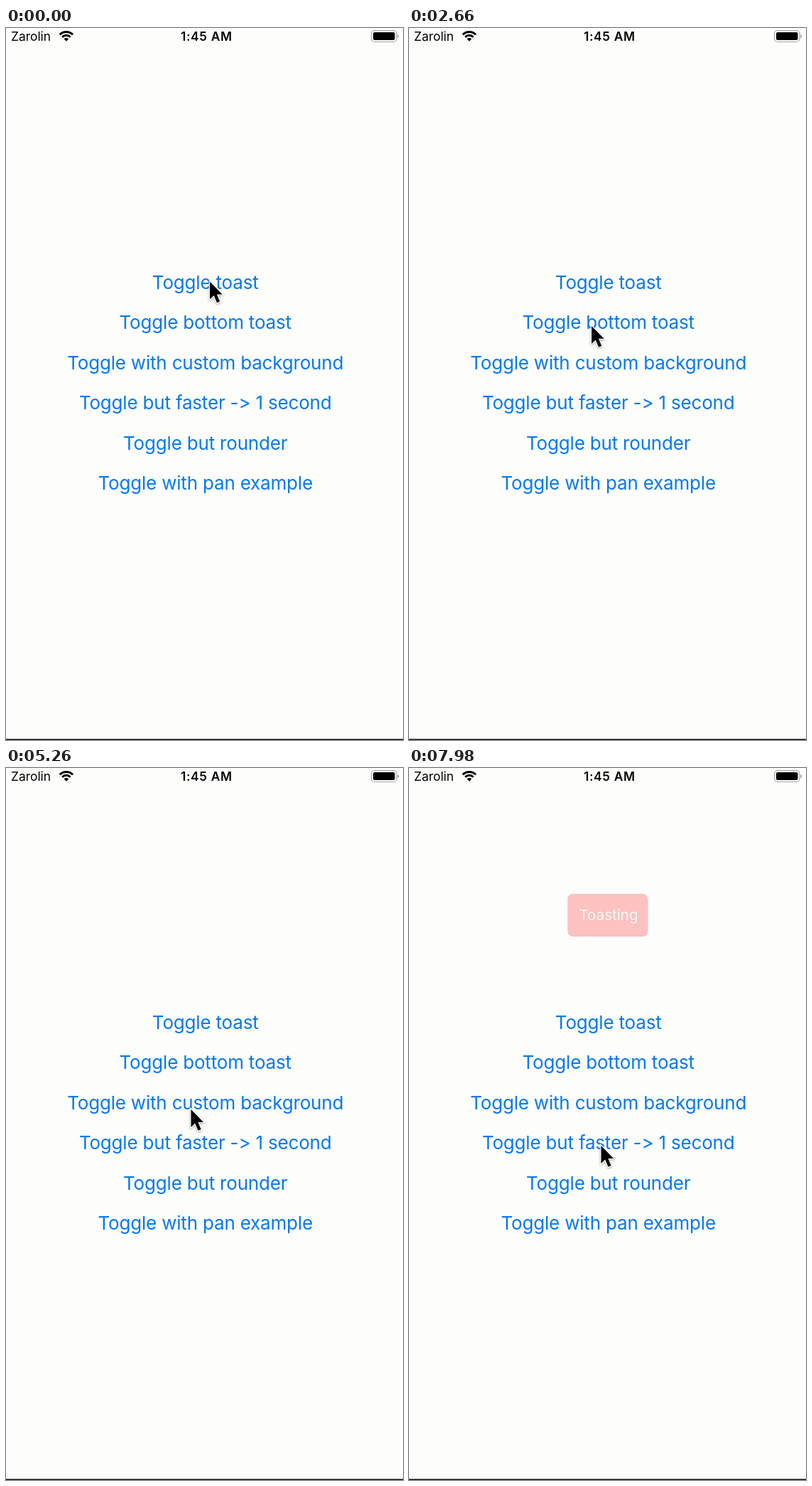
Recreate the animation shown at these times as an HTML page. Size 559 px wide and 1001 px high, loop 8000 ms.

```html
<!DOCTYPE html>
<html lang="en">
<head>
<meta charset="utf-8">
<title>Toast demo</title>
<style>
  html, body { margin: 0; width: 100%; height: 100%; overflow: hidden; background: #fdfdfb; }
  svg { display: block; width: 100%; height: 100%; }
  text { font-family: Inter, "Open Sans", sans-serif; }
  .status { font-size: 17.4px; }
  .time { font-weight: 600; letter-spacing: .65px; text-anchor: middle; }
  #buttons text { font-size: 26px; letter-spacing: -.19px; fill: #0578f2; text-anchor: middle; }
  #toast text { font-size: 20.4px; letter-spacing: .1px; fill: #eee; text-anchor: middle; }
  #cursor { filter: drop-shadow(0 1.5px 1.5px rgba(0, 0, 0, .35)); }
</style>
</head>
<body>
<svg viewBox="0 0 559 1001" preserveAspectRatio="none">
  <rect width="559" height="1001" fill="#fdfdfb"/>
  <rect y="999.5" width="559" height="1.5" fill="#111"/>

  <text class="status" x="7" y="18">Zarolin</text>
  <g fill="none" stroke="#000" stroke-width="3">
    <path d="M75.7 9.2a13 13 0 0 1 18.4 0M79.2 12.7a8 8 0 0 1 11.4 0"/>
    <path d="M84.9 18.8l-3.3-3.5a4.7 4.7 0 0 1 6.6 0z" fill="#000" stroke="none"/>
  </g>
  <text class="status time" x="282.3" y="18">1:45 AM</text>
  <rect x="514.5" y="3.5" width="35.5" height="16" rx="4.5" fill="none" stroke="#a4a4a4" stroke-width="1.2"/>
  <rect x="517" y="6" width="30.5" height="11" rx="2"/>
  <path d="M551.5 9a3 3 0 0 1 0 5.4z" fill="#999"/>

  <g id="buttons"></g>

  <g id="toast">
    <rect x="223.3" y="177" width="113.2" height="60" rx="7"/>
    <text x="281" y="214">Toasting</text>
  </g>

  <path id="cursor" d="M0 0V25L5.7 19.6L10 29.8L14.2 28L9.9 17.9H17.6Z"
        stroke="#fff" stroke-width="2.4" paint-order="stroke"/>
</svg>
<script>
const LOOP = 8000, FADE = 400, SHOWN = 2000, PRESS = 100, RELEASE = 340;
const labels = ["Toggle toast", "Toggle bottom toast", "Toggle with custom background",
  "Toggle but faster -> 1 second", "Toggle but rounder", "Toggle with pan example"];

// Each tap releases a button and shows one toast.
const taps = [
  { at: 396, dy: 0, color: "#000" },
  { at: 3224, dy: 522, color: "#000" },
  { at: 6106, dy: 0, color: "#f00" }
];

// Cursor moves: start, end, x, y
const home = [287, 356.5];
const moves = [
  [1200, 1850, 256.5, 420],
  [2550, 2950, 259.5, 414.5],
  [4350, 4950, 260.5, 480],
  [5450, 5750, 260.5, 475],
  [6650, 7300, 270.5, 531]
];

const byId = id => document.getElementById(id);
const toast = byId("toast"), cursor = byId("cursor");
const buttons = labels.map((label, i) => {
  const el = document.createElementNS("http://www.w3.org/2000/svg", "text");
  el.setAttribute("x", 280.7);
  el.setAttribute("y", 367 + 56.4 * i);
  el.textContent = label;
  return byId("buttons").appendChild(el);
});

function ease(t, start, end) {
  const p = Math.min(1, Math.max(0, (t - start) / (end - start)));
  return p * p * (3 - 2 * p);
}

function draw(t) {
  let alpha = 0;
  taps.forEach(({ at, dy, color }, i) => {
    const pressed = t >= at - PRESS;
    buttons[i].setAttribute("opacity", pressed ? .2 + .8 * ease(t, at, at + RELEASE) : 1);
    if (t < at || t > at + SHOWN) return;
    alpha = ease(t, at, at + FADE) - ease(t, at + SHOWN - FADE, at + SHOWN);
    toast.setAttribute("transform", `translate(0 ${dy})`);
    toast.firstElementChild.setAttribute("fill", color);
  });
  toast.setAttribute("opacity", alpha);

  let [x, y] = home;
  for (const [start, end, toX, toY] of moves) {
    const k = ease(t, start, end);
    x += (toX - x) * k;
    y += (toY - y) * k;
  }
  cursor.setAttribute("transform", `translate(${x} ${y})`);
}

const begin = performance.now();
function tick() {
  draw((performance.now() - begin) % LOOP);
  requestAnimationFrame(tick);
}
tick();
</script>
</body>
</html>
```
